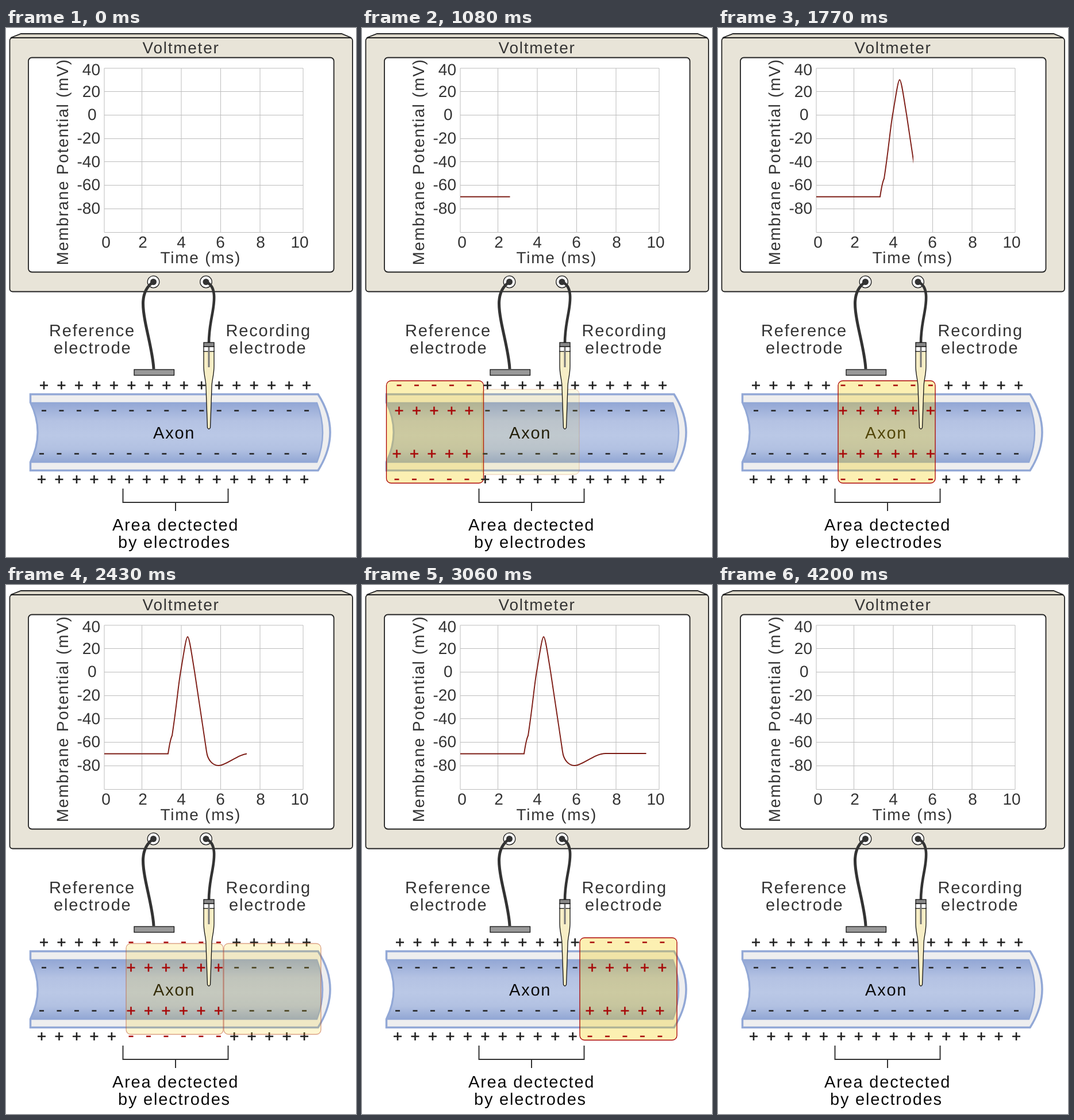
An HTML page for the animation above (4680 ms loop, 609x920 px).

```html
<!DOCTYPE html>
<html lang="en">
<head>
<meta charset="utf-8">
<title>Action potential</title>
<style>
html, body { margin: 0; width: 100%; height: 100%; overflow: hidden; background: #fff; }
svg { display: block; width: 609px; height: 920px; }
text { font: 28px "Liberation Sans", Arial, sans-serif; fill: #333; text-rendering: geometricPrecision; }
.wide { letter-spacing: 1.75px; }
.big { font-size: 29px; letter-spacing: 1.8px; }
.black { fill: #0a0a0a; }
.line { fill: none; stroke: #333; }
</style>
</head>
<body>
<svg viewBox="0 0 609 920">
  <defs>
    <linearGradient id="blue" x1="0" y1="0" x2="0" y2="1">
      <stop offset="0" stop-color="#93a7d5"/>
      <stop offset=".3" stop-color="#b4c2e3"/>
      <stop offset=".55" stop-color="#bac8e6"/>
      <stop offset=".78" stop-color="#b2c1e2"/>
      <stop offset="1" stop-color="#92a7d4"/>
    </linearGradient>
    <clipPath id="reveal"><rect id="wipe" x="160" y="60" height="300"/></clipPath>
  </defs>

  <!-- voltmeter -->
  <g stroke="#222" stroke-width="1.8">
    <path d="M8 17L26 10H584L601 17" fill="#ddd8ca"/>
    <rect x="6.5" y="17" width="596.5" height="441.5" rx="5" fill="#e8e4d8"/>
    <rect x="39" y="51.5" width="531.5" height="373" rx="6" fill="#fff"/>
  </g>
  <path id="grid" fill="none" stroke="#bdbdbd"/>
  <g id="labels"></g>
  <text class="wide" x="237.5" y="44">Voltmeter</text>
  <text class="wide" x="268.5" y="409">Time (ms)</text>
  <text class="wide" transform="translate(107.5 412.5) rotate(-90)">Membrane Potential (mV)</text>
  <path id="trace" clip-path="url(#reveal)" fill="none" stroke="#7d1c15" stroke-width="1.9" d="M171 293.5H282C284 280 286 268 289 262C297 210 300 172 304 150S313 90 316 90S323 120 328 150C334 190 342 243 349 290C351 305 360 314 370 314C384 314 404 293 424 293H517"/>

  <!-- axon -->
  <path d="M42.5 637H543Q585 703 543 769.5H42.5V755Q68 703 42.5 651Z" fill="#eeeeef" stroke="#92a8d6" stroke-width="3.5"/>
  <path d="M43 652H541Q561 704 541 755H43Q68 703 43 652Z" fill="url(#blue)" stroke="#92a8d6" stroke-width="2.5"/>
  <text class="big black" x="256" y="714">Axon</text>
  <g id="pulses"></g>

  <!-- electrodes -->
  <g fill="#fff" stroke="#222" stroke-width="1.3">
    <circle cx="256.5" cy="441.5" r="10.3"/>
    <circle cx="348" cy="441.5" r="10.3"/>
  </g>
  <circle cx="256.5" cy="441.5" r="5.5" fill="#333"/>
  <circle cx="348" cy="441.5" r="5.5" fill="#333"/>
  <path class="line" stroke-width="5" d="M256 442C232 458 238 490 243 515S256 570 257 593"/>
  <path class="line" stroke-width="4.6" d="M348 442C366 448 363 474 359.500 494S353 525 353 548"/>
  <g stroke="#111" stroke-width="1.3">
    <rect x="223" y="594" width="69.5" height="10" fill="#999"/>
    <path d="M344 562H362V588C362 604 358 612 358 625L355.5 695Q353 700 350.500 695L348 625C348 612 344 604 344 588Z" fill="#f7eec6"/>
    <rect x="344" y="554" width="18" height="8.500" fill="#fff"/>
    <rect x="344" y="547" width="18" height="7" fill="#888"/>
  </g>
  <path d="M353 555V590" stroke="#777" stroke-width="3"/>

  <text class="big" x="75" y="536">Reference</text>
  <text class="big" x="83" y="566">electrode</text>
  <text class="big" x="382.5" y="536">Recording</text>
  <text class="big" x="388" y="566">electrode</text>
  <path class="line" stroke-width="2" d="M203.500 801V825H386.500V801M295 825V840"/>
  <text class="big black" x="185" y="874">Area dectected</text>
  <text class="big black" x="195" y="904">by electrodes</text>
</svg>
<script>
const LOOP = 4680, STEP = 30, FADE = 240, GAP = 30.47;
const $ = id => document.getElementById(id);
const clamp = v => Math.max(0, Math.min(1, v));

function add(parent, tag, attrs, text = '') {
  const el = document.createElementNS('http://www.w3.org/2000/svg', tag);
  set(el, attrs);
  el.textContent = text;
  return parent.appendChild(el);
}
function set(el, attrs) {
  for (const k in attrs) el.setAttribute(k, attrs[k]);
}

// Graph grid and axis numbers
const cols = [171, 236.5, 305, 373.5, 442, 517];
const rows = [70, 110.5, 151.5, 192.5, 232.5, 273.5, 314.5, 355.5];
$('grid').setAttribute('d',
  cols.map(x => `M${x} 70V355.5`).join('') + rows.map(y => `M171 ${y}H517`).join(''));
[174, 238, 305, 373, 443, 511].forEach((x, i) =>
  add($('labels'), 'text', { x, y: 382, 'text-anchor': 'middle' }, i * 2));
[82, 120, 160, 201, 242, 282, 323].forEach((y, i) =>
  add($('labels'), 'text', { x: i == 2 ? 157.5 : 164, y, 'text-anchor': 'end' }, 40 - i * 20));

// Charges: plus outside and minus inside at rest, swapped while active
const plus = (x, y) => `M${x - 7} ${y}h14M${x} ${y - 7}v14`;
const minus = (x, y) => `M${x - 4} ${y}h8`;
function charges(count, top, low, outer, inner) {
  let d = '';
  for (let i = 0; i < count; i++) {
    const dx = i * GAP;
    d += outer(top + dx, 621.5) + inner(top + dx, 665.5)
      + inner(low + dx, 740.5) + outer(low + dx, 785);
  }
  return d;
}

// Each pulse: left edge, charges, start of rise and fall, first active charge above and below
const pulses = [
  [42.5, 0, 5, 300, 1200, 64.5, 60.5],
  [209, 5, 6, 1020, 2310, 217.5, 217.5],
  [379, 11, 5, 2310, 3450, 400.5, 396.5]
].map(([x, first, count, rise, fall, top, low]) => {
  const g = $('pulses'), left = 66 + first * GAP;
  const sign = (stroke, ...row) =>
    add(g, 'path', { stroke, 'stroke-width': 2.6, d: charges(count, ...row) });
  return {
    rise, fall,
    rest: sign('#222', left, left - 4, plus, minus),
    box: add(g, 'rect', { x, width: 169, rx: 8, fill: '#f5cd00', 'stroke-width': 1.3 }),
    active: sign('#a80a0a', top, low, minus, plus)
  };
});

function drawPulse({ rise, fall, rest, box, active }, t) {
  const falling = t > fall;
  const p = falling ? 1 - clamp((t - fall) / FADE) : clamp((t - rise) / FADE);
  const swap = clamp(falling ? p / 0.5 : (p - 0.6) / 0.4);
  const half = 69 + 20 * p;
  set(box, {
    y: 702.5 - half, height: 2 * half,
    'fill-opacity': 0.3 * p ** 0.75, 'stroke-opacity': p,
    stroke: `rgb(${200 - 30 * p},${150 * (1 - p)},${70 * (1 - p)})`
  });
  rest.setAttribute('opacity', 1 - swap);
  active.setAttribute('opacity', swap);
}

function draw(now) {
  const t = Math.floor(now % LOOP / STEP) * STEP;
  $('wipe').setAttribute('width', Math.max(0, 97.5 + (t - 1080) * 0.1197));
  $('trace').setAttribute('opacity', 1 - clamp((t - 3930) / 270));
  pulses.forEach(p => drawPulse(p, t));
}

const start = performance.now();
function tick() {
  draw(performance.now() - start);
  requestAnimationFrame(tick);
}
tick();
</script>
</body>
</html>
```
